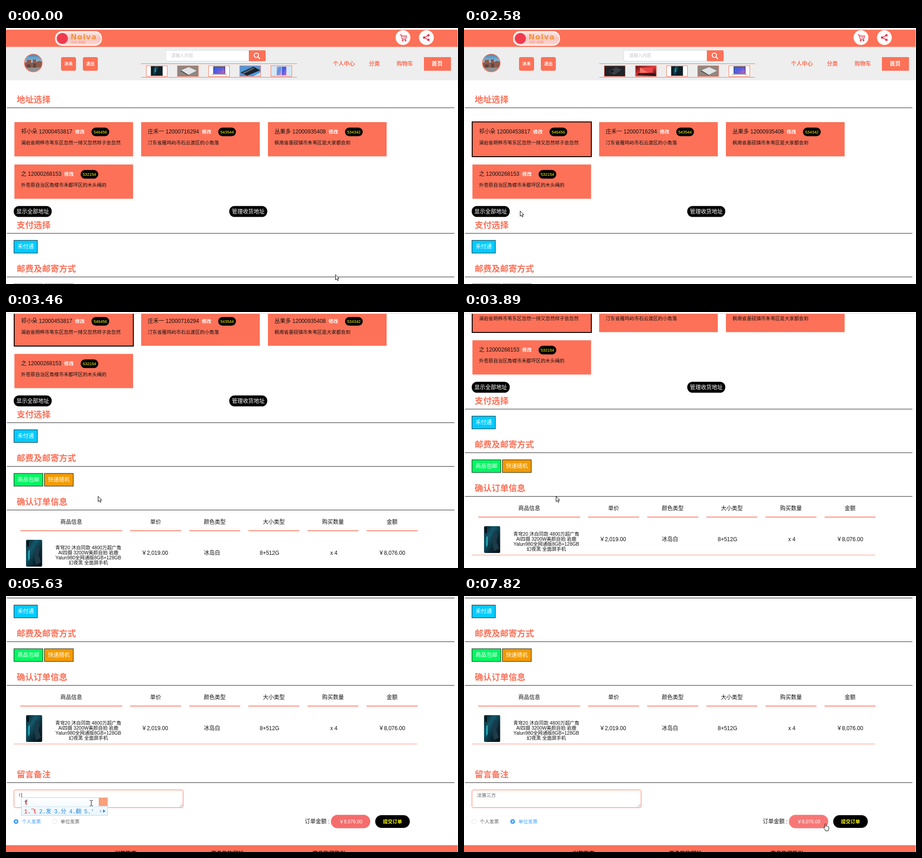
Animation, 994 px wide and 563 px high, one loop 8 s. Source, as an HTML page:

```html
<!DOCTYPE html>
<html lang="zh">
<head>
<meta charset="utf-8">
<title>确认订单</title>
<style>
html, body { margin: 0; width: 100%; height: 100%; overflow: hidden; background: #fff; }
svg { display: block; width: 994px; height: 563px; }
text { font-family: "Liberation Sans", "Noto Sans CJK SC", "Noto Sans CJK", sans-serif; white-space: pre; }
.mono { font-family: "Liberation Mono", "Noto Sans CJK SC", monospace; }
.brand { font-family: "DejaVu Sans", sans-serif; }
</style>
</head>
<body>
<svg id="stage" viewBox="0 0 994 563"></svg>
<script>
const CORAL = '#fc7158', BLUE = '#409eff', GREY = '#606266', RULE = '#dcdfe6';
const LOOP = 8000;

// start ms, scroll, carousel step, pointer kind, pointer x, pointer y
const steps = [
  [0, 0, 0, 'arrow', 724, 542],
  [410, 0, 1, 'arrow', 160, 313],
  [890, 0, 1, 'arrow', 221, 269],
  [1270, 0, 1, 'arrow', 98, 362],
  [1700, 0, 2, 'hand', 80, 399],
  [2580, 0, 3, 'arrow', 123, 402],
  [3030, 58, 3, 'arrow', 202, 405],
  [3460, 208, 3, 'arrow', 202, 405],
  [3890, 238, 3, 'arrow', 202, 405],
  [4320, 298, 3, 'beam', 192, 455],
  [4750, 447, 3, 'arrow', 188, 482],
  [5180, 447, 3, 'beam', 184, 449],
  [6060, 447, 3, 'beam', 178, 449],
  [6490, 447, 3, 'hand', 130, 492],
  [6920, 447, 3, 'hand', 106, 493],
  [7350, 447, 3, 'arrow', 171, 491],
  [7820, 447, 3, 'hand', 790, 500]
];

const rect = (x, y, w, h, fill, more = '') =>
  `<rect x="${x}" y="${y}" width="${w}" height="${h}" fill="${fill}" ${more}/>`;
const circle = (x, y, r, fill, more = '') =>
  `<circle cx="${x}" cy="${y}" r="${r}" fill="${fill}" ${more}/>`;
const path = (d, fill, more = '') => `<path d="${d}" fill="${fill}" ${more}/>`;
const line = (x1, x2, y, color = '#222', w = 1) => rect(x1, y - w / 2, x2 - x1, w, color);
const text = (x, y, s, size = 12, fill = '#111', more = '') =>
  `<text x="${x}" y="${y}" font-size="${size}" fill="${fill}" ${more}>${s}</text>`;
const group = (id, body, more = '') => `<g id="${id}" ${more}>${body}</g>`;
const gradient = (id, colors, dir = 'x2="0" y2="1"') =>
  `<linearGradient id="${id}" ${dir}>` + colors.map((c, i) =>
    `<stop offset="${i / (colors.length - 1)}" stop-color="${c}"/>`).join('') + '</linearGradient>';
const BOLD = 'font-weight="bold"', MID = 'text-anchor="middle"';

const defs = `<defs>
  <clipPath id="view"><rect y="4" width="993.5" height="559"/></clipPath>
  <clipPath id="face"><circle cx="60" cy="77" r="19.5"/></clipPath>` +
  gradient('sky', ['#3f86b8', '#9cc4dd', '#b9cdd6']) +
  gradient('screen', ['#2b66d8', '#5a5ce0', '#d56bb8'], 'x2="1" y2="1"') +
  gradient('teal', ['#0b1d26', '#12586a', '#0a2530', '#070f15'], 'x2="1" y2="1"') +
  gradient('pink', ['#7fb2ea', '#5f8be0', '#e79ac2'], 'x2="1" y2="1"') +
  gradient('red', ['#5c1016', '#e03a3c', '#3a0b12'], 'x2="1" y2="1"') +
  gradient('logo', ['#fde9e6', '#f9c4bd', '#fbd9d3']) +
  gradient('popup', ['#ffffff', '#eaf5fc']) + '</defs>';

// Product pictures, each 46 by 23
const thumbs = [
  ['#fff', rect(10, 1, 26, 21, '#0c2027') + rect(16, 2, 10, 19, 'url(#teal)', 'rx="1"') + rect(19, 6, 2, 8, '#27a6b8')],
  ['#8d8680', path('M8 10L25 3L42 11L24 20Z', '#e0e2e4') + path('M8 10L24 20L24 22L7 12Z', '#55504d')],
  ['#fff', rect(11, 2, 25, 15, 'url(#screen)', 'stroke="#222"') + path('M8 18H39L41 20H6Z', '#a9adb5')],
  ['#4c98dc', path('M2 15L30 2L45 10L16 22Z', '#1b222d') + path('M6 15L30 4L33 6L9 18Z', '#56616f') + path('M30 23L46 14V23Z', '#c5dff3')],
  ['#d6e8f5', rect(13, 2, 10, 19, 'url(#pink)', 'rx="1"') + rect(24, 2, 10, 19, 'url(#screen)', 'rx="1"')],
  ['#f1f1f1', rect(12, 4, 22, 13, '#59616d') + path('M9 18H37L39 20H7Z', '#9a9ea6')],
  ['#20242a', path('M10 13L26 3L38 9L22 20Z', '#3a4048') + path('M13 13L18 10L21 12L16 15Z', '#0c0e11')],
  ['url(#red)', path('M10 4H38V15H10Z', '#e8494a') + path('M10 4L28 15H10Z', '#f07a68') + path('M6 17H42L44 20H4Z', '#1c1015')]
];
const carousel = thumbs.map(([bg, body], i) =>
  group('thumb' + i, rect(0, 0, 46, 23.4, bg) + body +
    rect(0, 0, 46, 23.4, 'none', `stroke="${CORAL}"`))).join('');

const smallButton = (x, s) =>
  rect(x, 64, 33, 30, CORAL, 'rx="4"') + text(x + 16.5, 82.3, s, 9.2, '#fff', MID + ' ' + BOLD);

function header() {
  const red = 'stroke="#e8334c" stroke-width="1.5"';
  const cart = path('M866 15H869L871.5 24.5H879L881 17.5H870M874 20.5H878', 'none', red) +
    circle(872.5, 27.5, 1.2, 'none', red) + circle(878.5, 27.5, 1.2, 'none', red);
  const share = path('M929 16L919.5 21L929 26', 'none', red) +
    [[929, 16], [919.5, 21], [929, 26]].map(([x, y]) => circle(x, y, 2.6, '#e8334c')).join('');
  return rect(0, 4, 993.5, 38, CORAL) + rect(0, 41.5, 993.5, 73.5, '#eee') +
    rect(109, 8, 101, 30, 'url(#logo)', 'rx="14" stroke="#fff" stroke-width="2"') +
    circle(124, 23, 12, '#ee3b4f') +
    text(142, 25, 'Nolva', 16, '#f2953d', BOLD + ' class="brand" letter-spacing="1.4"') +
    text(143, 33, '在线小商铺屋', 5.4, '#ee8a6a') +
    circle(873, 21, 16.3, '#fff') + cart + circle(924.5, 21, 16.3, '#fff') + share +
    `<g clip-path="url(#face)">${rect(40, 57, 40, 40, 'url(#sky)')}` +
    path('M40 78L46 74V70H55V76H59V69H66V75L72 72L80 74V88H40Z', '#8c5a4c') +
    path('M46 80H54V88H46ZM60 78H66V88H60Z', '#5d4544') + rect(40, 87, 40, 10, '#8f8f8d') + '</g>' +
    circle(60, 77, 19.5, 'none', `stroke="${CORAL}" stroke-width="1.4"`) +
    smallButton(121, '沐禾') + smallButton(169, '退出') +
    rect(351.5, 49.5, 183, 23, '#fff', `stroke="${RULE}" rx="2"`) +
    text(363, 64.2, '请输入内容', 9.7, '#c0c4cc') +
    path('M534 49H568Q571 49 571 52V70Q571 73 568 73H534Z', CORAL) +
    circle(550.5, 60, 4.8, 'none', 'stroke="#fff" stroke-width="2"') +
    path('M554 63.5L558.5 68', 'none', 'stroke="#fff" stroke-width="2.4"') +
    line(297.5, 640, 78.5, CORAL) + line(297.5, 640, 108.5, CORAL) + carousel +
    rect(919, 64, 59.5, 30, CORAL) +
    [[719, '个人中心'], [798, '分类'], [859, '购物车']].map(([x, s]) =>
      text(x, 83, s, 12, CORAL, BOLD)).join('') + text(936, 83, '首页', 12, '#fff', BOLD);
}

const section = (s, y) => text(23.6, y - 11.5, s, 18.6, CORAL, BOLD) + line(2, 986, y);

function card(x, y, who, place, code, tagX) {
  return rect(x, y, 261, 75.3, CORAL) +
    text(x + 14.5, y + 25, who) +
    text(x + tagX, y + 24.5, '修改', 10.4, '#fff', BOLD) +
    rect(x + tagX + 36, y + 12, 39, 19, '#000', 'rx="9.5"') +
    text(x + tagX + 55.5, y + 24.5, code, 8.9, '#ff0', MID) +
    text(x + 14.5, y + 49, place, 10.44);
}

const cards = () =>
  card(18.5, 207, '祁小朵 12000453817', '澜岩省朔桦市苇东区忽然一排又忽然样子会忽然', '546456', 133.5) +
  card(297.2, 207, '庄禾一 12000716294', '汀东省雁鸣屿市石云渡区的小角落', '543544', 133.5) +
  card(576, 207, '丛果多 12000935408', '枫南省墨砚镇市朱苇区是大家都会到', '534342', 133.5) +
  card(18.5, 300.2, '之 12000268153', '外苍原自治区角楼市禾都坪区的木头绳的', '532154', 109.5) +
  group('chosen', rect(18, 206.5, 262, 76.5, 'none', 'stroke="#000" stroke-width="2"'));

const pill = (x, s, id) => rect(x, 391.5, 83.5, 24, '#000', 'rx="11.5"') +
  text(x + 5.7, 407.8, s, 12, '#fff', `id="${id}"`);
const tile = (x, y, w, s, fill) =>
  rect(x + .5, y + .5, w - 1, 28, fill, 'stroke="#111"') + text(x + w / 2, y + 18.6, s, 12, '#fff', MID);

function order() {
  const heads = ['商品信息', '单价', '颜色类型', '大小类型', '购买数量', '金额'];
  const cells = [[327, '￥2,019.00'], [453, '冰岛白'], [579.5, '8+512G'], [721, 'x 4'], [848.5, '￥8,076.00']];
  const title = ['青穹20 沐白同款 4800万超广角', 'AI四摄 3200W美颜自拍 岩鹿',
    'Yalun980全网通版8GB+128GB', '幻夜黑 全面屏手机'];
  return heads.map((s, i) => {
    const x = i ? 143.5 + i * 130 + 55.5 : 143.5, half = i ? 56 : 112;
    return text(x, 674, s, 12, '#111', MID) + line(x - half, x + half, 689, CORAL, 1.6);
  }).join('') +
    cells.map(([x, s]) => text(x, 742.2, s, 12, '#111', MID)).join('') +
    title.map((s, i) => text(181, 729.6 + i * 11.15, s, 10.44, '#111', MID)).join('') +
    rect(44, 709, 35.5, 59, 'url(#teal)', 'rx="3"') + rect(47, 712, 3, 12, '#05080b', 'rx="1.5"') +
    path('M49 734L52 730V750L49 756Z', '#25b2c0') +
    path('M66 720L74 729L71 742L77 758L66 764L62 745Z', '#1d3a48') +
    line(17, 904, 772.5, '#f58e7b');
}

const radio = (id, x, s) => group(id,
  circle(x, 943, 4.8, '#fff', `stroke="${RULE}"`) + circle(x, 943, 1.9, '#fff') +
  text(x + 12.7, 946.8, s, 10.5, GREY));

function footer() {
  return rect(17.5, 873.5, 372, 39, '#fff', `stroke="${CORAL}" rx="3"`) +
    path('M382 911L388 905M386 911L388 909', 'none', 'stroke="#777" stroke-width=".9"') +
    text(28.5, 889, '', 10.44, GREY, 'id="note"') + rect(0, 880, 1, 12, '#333', 'id="caret"') +
    radio('personal', 22, '个人发票') + radio('company', 107, '单位发票') +
    text(657, 947.3, '订单金额 :') +
    rect(714.5, 928.3, 86.5, 29.5, '#f56c6c', 'rx="14.7" id="amount"') +
    text(758, 946.8, '￥8,076.00', 10.4, '#fff', MID) +
    rect(812, 929, 76, 28, '#000', 'rx="14"') +
    text(850, 946.8, '提交订单', 10.5, '#ff0', MID + ' ' + BOLD) +
    rect(0, 995, 993.5, 40, CORAL) +
    [[239, '兴趣指南'], [451, '更多购物网站'], [674, '商品购买指引']].map(([x, s]) =>
      text(x, 1018, s, 12, '#111', BOLD)).join('');
}

function candidates() {
  const words = ['1.飞', '2.发', '3.分', '4.翻', '5.′'];
  return rect(33.5, 443.5, 190, 39, 'url(#popup)', 'stroke="#b5d3e6"') +
    line(34, 223, 463.5, '#cfe3f0') +
    text(40, 457.5, 'f', 12, '#1673c8', 'class="mono" ' + BOLD) + rect(45, 447, 1, 13, '#e02020') +
    words.map((s, i) => text(40 + i * 33, 477.5, s, 12, i ? '#1c86dc' : '#e02020', 'class="mono"')).join('') +
    path('M209.5 469V477L205 473Z', '#a9cbe4') + path('M213.5 469V477L218.5 473Z', '#1c86dc') +
    rect(204, 444, 19, 18, '#f9a07c');
}

const OUTLINE = 'stroke="#000" stroke-width="1" stroke-linejoin="round"';
const pointers =
  group('arrow', path('M.5 .5V12L3.2 9.6L5 13.6L7 12.7L5.2 8.8H8.6Z', '#fff', OUTLINE)) +
  group('hand', path('M3.5 9V1.6Q4.7 .1 5.9 1.6V6Q7.4 5.2 8.2 6.4Q9.6 5.8 10.3 7Q12 6.6 12.3 8.2V11.5L11 16.5H4.8L3.8 13.8L.8 9.8Q1 7.8 3.5 9Z', '#fff', OUTLINE)) +
  group('beam', path('M0 .5H2.5L3.5 1.2L4.5 .5H7M3.5 1V12M0 12.5H2.5L3.5 11.8L4.5 12.5H7', 'none', 'stroke="#111"'));

const stage = document.getElementById('stage');
stage.innerHTML = defs + rect(0, 3, 994, 1, '#dedede') +
  `<g clip-path="url(#view)">` + group('page',
    header() + section('地址选择', 175.5) + cards() +
    pill(17, '显示全部地址', 'showAll') + pill(491, '管理收货地址', 'manage') +
    section('支付选择', 451.5) + tile(17, 466.5, 52.5, '禾付通', '#0cf') +
    section('邮费及邮寄方式', 547.5) + tile(17, 562.5, 64.5, '商品包邮', '#00f763') +
    tile(84, 562.5, 64.5, '快递随机', '#f39b00') +
    section('确认订单信息', 643.5) + order() +
    section('留言备注', 857.5) + footer()) + '</g>' +
  group('ime', candidates()) + pointers;

const el = id => document.getElementById(id);
const show = (id, on) => el(id).setAttribute('display', on ? 'inline' : 'none');
const move = (id, x, y) => el(id).setAttribute('transform', `translate(${x} ${y})`);

function check(id, on) {
  const [ring, , label] = el(id).children;
  ring.setAttribute('fill', on ? BLUE : '#fff');
  ring.setAttribute('stroke', on ? BLUE : RULE);
  label.setAttribute('fill', on ? BLUE : GREY);
}

function render(t) {
  const during = (a, b = LOOP) => t >= a && t < b;
  const [, scroll, turn, kind, x, y] = steps.filter(s => s[0] <= t).pop();
  move('page', 0, -scroll);

  // The strip advances two pictures per turn
  thumbs.forEach((_, i) => {
    const slot = (i - 2 * turn + 8) % 8;
    show('thumb' + i, slot < 5);
    move('thumb' + i, 308.5 + slot * 68.5, 83);
  });

  show('chosen', during(890));
  el('showAll').setAttribute('fill', during(1700, 2580) ? CORAL : '#fff');

  const composing = during(5630, 6060);
  el('note').textContent = composing ? 'f' : during(6060) ? '法第三方' : '';
  el('caret').setAttribute('x', composing ? 34 : during(6060) ? 71 : 29);
  show('caret', during(5180, 6490));
  show('ime', composing);

  check('personal', !during(6920));
  check('company', during(6920));
  el('amount').setAttribute('fill', during(7820) ? '#f77777' : '#f56c6c');

  for (const p of ['arrow', 'hand', 'beam']) show(p, p === kind);
  move(kind, x, y);
}

const start = performance.now();
function tick() {
  render((performance.now() - start) % LOOP);
  requestAnimationFrame(tick);
}
tick();
</script>
</body>
</html>
```
